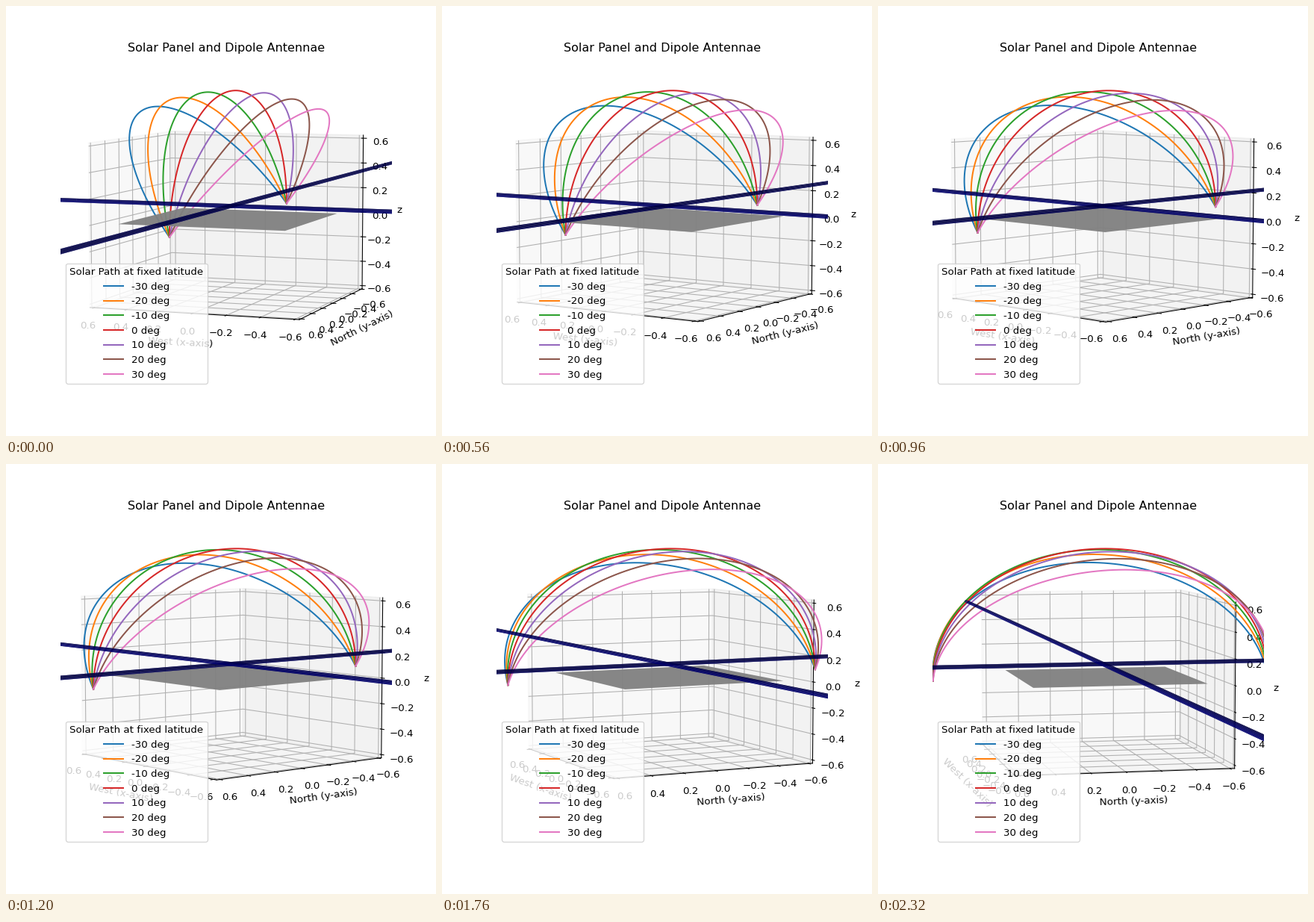
Recreate the animation shown at these times as a matplotlib script. Size 576 px wide and 576 px high, loop 2400 ms.

```python
import numpy as np
import matplotlib.pyplot as plt
from matplotlib.animation import FuncAnimation

FRAMES, INTERVAL = 30, 80
ELEVATION, START_AZIMUTH, AZIMUTH_STEP = 6, 110, 2
LIMIT = 0.625
PATH_SHIFT = -0.015

fig = plt.figure(figsize=(6, 6), dpi=96)
ax = fig.add_subplot(projection="3d")


def draw_sun_path(tilt_deg):
    """Unit half circle from north to south, tilted about the y-axis."""
    tilt = np.radians(tilt_deg)
    t = np.linspace(0, np.pi, 100)
    ax.plot(PATH_SHIFT - np.sin(tilt) * np.sin(t), np.cos(t),
            np.cos(tilt) * np.sin(t), label=f"{tilt_deg} deg")


def draw_panel(half=0.5):
    x, y = np.meshgrid([-half, half], [-half, half])
    ax.plot_surface(x, y, np.zeros_like(x), color="gray", alpha=0.95,
                    shade=False, linewidth=0)


def draw_dipole(along_x, length=6, radius=0.016, height=0.1):
    angle, along = np.meshgrid(np.linspace(0, 2 * np.pi, 13),
                               np.linspace(-length, length, 13))
    across = radius * np.cos(angle)
    z = height + radius * np.sin(angle)
    x, y = (along, -across) if along_x else (across, along)
    ax.plot_surface(x, y, z, color="navy", alpha=0.75, rstride=1, cstride=1)


for degrees in range(-30, 31, 10):
    draw_sun_path(degrees)
draw_panel()
draw_dipole(along_x=True)
draw_dipole(along_x=False)

ax.set(xlim=(-LIMIT, LIMIT), ylim=(-LIMIT, LIMIT), zlim=(-LIMIT, LIMIT),
       xlabel="West (x-axis)", ylabel="North (y-axis)", zlabel="z",
       title="Solar Panel and Dipole Antennae")
ax.legend(title="Solar Path at fixed latitude", loc="lower left")


def update(frame):
    ax.view_init(ELEVATION, START_AZIMUTH + AZIMUTH_STEP * frame)
    return []


anim = FuncAnimation(fig, update, frames=FRAMES, interval=INTERVAL,
                     init_func=lambda: [], repeat=True)
plt.show()
```
